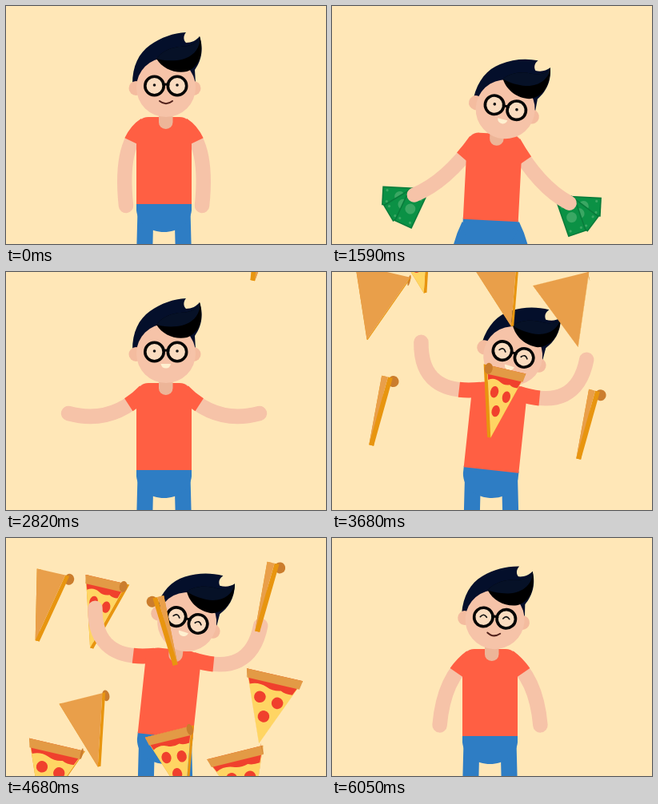
Write an HTML page with a canvas that moves like this. It is 400 px wide and 298 px high and loops after 6.1 s.

```html
<!DOCTYPE html>
<html lang="en">
<head>
<meta charset="utf-8">
<title>Money and pizza dance</title>
<style>
html, body { margin: 0; width: 100%; height: 100%; overflow: hidden; background: #ffe7b7; }
canvas { display: block; }
</style>
</head>
<body>
<canvas id="stage" width="400" height="298"></canvas>
<script>
const g = document.getElementById('stage').getContext('2d');
const LOOP = 6100, AXIS = 197.5, HIP = 248, RELEASE = 2160;
const SKIN = '#f6c3a8', SHIRT = '#ff5f43', JEANS = '#2e7dc4', NAVY = '#040f2b';
const CRUST = '#e39a45', SAUCE = '#f0402d';

const rad = deg => deg * Math.PI / 180;
const mix = (a, b, e) => a.map((v, i) => v + (b[i] - v) * e);
// Sine wave that only runs from a to b; bump is one half wave.
const sway = (t, a, b, period) => t > a && t < b ? Math.sin(2 * Math.PI * (t - a) / period) : 0;
const bump = (t, a, b) => sway(t, a, b, 2 * (b - a));

const beat = t => sway(t, 902, 2002, 550);
const dance = t => -sway(t, 3022, 5522, 1000);
const lean = t => 3 * beat(t) + 7.2 * dance(t);
const nod = t => 11 * beat(t) + 12.5 * dance(t + 50) + 5.5 * bump(t, 5522, 6300);
const bob = t => 15 * beat(t) + 6 * bump(t, 900, 2000) - 5 * bump(t, 0, 650)
  - 4 * bump(t, 2002, 2500) + 4 * bump(t, 5200, 5620);

// Arm poses: curve control and hand, each as distance from the body axis and height.
const REST = [56, 170, 47.5, 250];
const BACK = [85, 200, 18, 222];
const MONEY = [58, 203, 97, 221];
const WIDE = [65, 192, 119.5, 177];
const UP = [98, 165, 104, 98];
const SPREAD = mix(REST, WIDE, 1.25);

const arms = [[0, REST], [350, mix(REST, WIDE, 0.13)], [650, REST], [850, BACK], [1200, SPREAD],
  [1590, MONEY], [1865, SPREAD], [2010, MONEY], [2220, UP], [2450, UP], [2780, WIDE],
  [2850, WIDE], [3080, UP], [5330, UP], [5600, WIDE], [6250, REST]];

// Falling slices: x, the time each passes height 100, and its yaw then.
const drops = [[319, 3345, 157], [60, 3411, 145], [207, 3449, 88], [296, 3884, 141],
  [214, 3985, 91], [55, 3920, 125], [118, 4715, -50], [327, 4257, 77],
  [200, 4633, 272], [105, 4145, 237], [325, 4795, 77], [50, 4750, 108]];

function armPose(t) {
  const i = arms.findIndex(k => k[0] > t);
  const [t0, a] = arms[i - 1], [t1, b] = arms[i];
  return mix(a, b, (1 - Math.cos(Math.PI * (t - t0) / (t1 - t0))) / 2);
}

function group(draw) { g.save(); draw(); g.restore(); }

function fill(color, path) {
  g.fillStyle = color;
  g.fill(new Path2D(path));
}

function line(color, width, path) {
  g.strokeStyle = color;
  g.lineWidth = width;
  g.stroke(new Path2D(path));
}

function oval(color, x, y, rx, ry = rx) {
  g.fillStyle = color;
  g.beginPath();
  g.ellipse(x, y, rx, ry, 0, 0, 2 * Math.PI);
  g.fill();
}

function box(color, x, y, w, h, r = 0) {
  g.fillStyle = color;
  g.beginPath();
  g.roundRect(x, y, w, h, r);
  g.fill();
}

// A flat wedge turning about its own upright axis.
function slice(i, t) {
  const [x, t0, yaw0] = drops[i], s = (t - t0) / 1000, y = 100 + 260 * s;
  if (y < -70 || y > 370) return;
  const yaw = rad(yaw0 - 180 * s), c = Math.cos(yaw), n = Math.sin(yaw);
  const front = c > 0, near = front ? 3 : -3;
  const px = (u, z) => u * c + z * n;
  const corners = z => [[px(-36, z), -40], [px(36, z), -40], [px(0, z), 48]];
  const poly = pts => 'M' + pts.join('L') + 'Z';
  const roll = () => oval('#cb7d2d', px(n < 0 ? 34 : -34, 5), -36, 7 * Math.abs(n), 7);

  group(() => {
    g.translate(x, y);
    g.rotate(rad(i % 5 > 2 ? -14 : 13));
    if (!front) roll();
    const f = corners(near), b = corners(-near);
    for (let k = 0; k < 3; k++) {
      const j = (k + 1) % 3;
      fill('#e8950f', poly([f[k], f[j], b[j], b[k]]));
    }
    fill(front ? '#ffd563' : '#e99f4a', poly(f));
    if (!front) return;
    group(() => {
      g.translate(near * n, 0);
      g.scale(c, 1);
      fill(SAUCE, 'M-36,-40H36L27,-20Q18,-19 12,-22Q2,-19 -7,-23Q-18,-27 -28,-22Z');
      fill(CRUST, 'M-36,-40H36L34,-29H-33Z');
      for (const [u, v] of [[-12, -9], [11, -6], [-2, 14]]) oval(SAUCE, u, v, 7.3);
    });
    roll();
  });
}

function bill() {
  box('#087a3a', -4, -9, 44, 24);
  box('#0b9145', -2.5, -7.5, 41, 21);
  oval('#3aa763', 18, 3, 6.5);
  for (const u of [2, 34]) for (const v of [-4, 10]) oval('#3aa763', u, v, 1.6);
}

function bills(x, y, t) {
  if (t < 900 || t > 2600) return;
  const s = Math.max(0, t - RELEASE);
  for (let i = 0; i < 3; i++) group(() => {
    g.translate(x + s * (0.09 - 0.07 * i), y - s * (0.5 + 0.06 * i));
    g.rotate(rad(34 * i - s * (0.35 + 0.15 * i)));
    bill();
  });
}

function arm(side, t) {
  const [cx, cy, x, y] = armPose(t);
  const path = `M23.5,149Q${cx},${cy} ${x},${y}`;
  group(() => {
    g.translate(AXIS, 0);
    g.scale(side, 1);
    bills(x, y, t);
    g.lineCap = 'round';
    line(SKIN, 18.5, path);
    g.lineCap = 'butt';
    g.setLineDash([27, 999]);
    line(SHIRT, 19, path);
  });
}

function legs(x, dy) {
  const bend = Math.max(0, dy);
  g.lineCap = 'butt';
  for (const s of [-1, 1]) {
    line(JEANS, 20 + 0.4 * bend,
      `M${x + s * 23},${256 + dy}Q${x + s * (25 + 1.2 * bend)},330 ${x + s * 26},400`);
  }
}

function head(t) {
  const happy = t > 3080, laughing = t > 1000 && t < 5800;
  fill(NAVY, 'M158,98C158,75 166,59 180,49C194,39 209,34 225,33C221,38 222,43 225,46' +
    'C232,46 238,43 242,38C248,56 243,70 236,80L237,97Z');
  for (const x of [162.5, 234.5]) oval('#f4bc9f', x, 103, 9);
  oval(SKIN, 200, 102, 37);
  fill('#000', 'M188,66C196,79 212,85 226,82C241,77 248,60 242,38C240,48 228,51 216,51C203,53 194,58 188,66Z');
  fill('#061127', 'M188,66C194,58 203,53 216,51C228,51 240,48 242,38C244,53 233,66 214,68C204,69 195,68 188,66Z');

  g.lineCap = 'round';
  for (const x of [185.5, 214]) {
    oval('#fadcc0', x, 100, 12);
    if (happy) line('#111', 1.7, `M${x - 4},100Q${x},94.5 ${x + 4},100`);
    else oval('#111', x, 99, 1.8);
    g.strokeStyle = '#050505';
    g.lineWidth = 3.6;
    g.beginPath();
    g.arc(x, 100, 11.7, 0, 2 * Math.PI);
    g.stroke();
  }
  line('#050505', 3, 'M197,99Q200,97 203,99');

  if (laughing) fill('#fff0d0', 'M193.5,115H206Q205,120.5 200,120.5Q194.5,120.5 193.5,115Z');
  else line('#51211b', 2, 'M192,119Q200,125.5 208,119');
}

function person(t) {
  const angle = lean(t), dy = bob(t), x = AXIS + angle * 0.25;
  legs(x, dy);
  group(() => {
    g.translate(x, HIP + dy);
    g.rotate(rad(angle));
    g.translate(-AXIS, -HIP);
    fill(JEANS, 'M163,246H232V256C230,274 214,283 197.5,283C181,283 165,274 163,256Z');
    arm(-1, t);
    arm(1, t);
    box(SHIRT, 163, 139, 69, 109, [15, 15, 0, 0]);
    box('#edb598', 191, 128, 17.5, 26, 8.5);
    // The head sinks a little when crouching.
    g.translate(200, 147 + 0.25 * Math.max(0, dy));
    g.rotate(rad(nod(t)));
    g.translate(-200, -147);
    head(t);
  });
}

function rain(t, behind) {
  if (t < 2750) return;
  drops.forEach((_, i) => { if ((i % 5 === 1) === behind) slice(i, t); });
}

function frame() {
  const t = performance.now() % LOOP;
  g.fillStyle = '#ffe7b7';
  g.fillRect(0, 0, 400, 298);
  rain(t, true);
  person(t);
  rain(t, false);
  requestAnimationFrame(frame);
}
frame();
</script>
</body>
</html>
```
